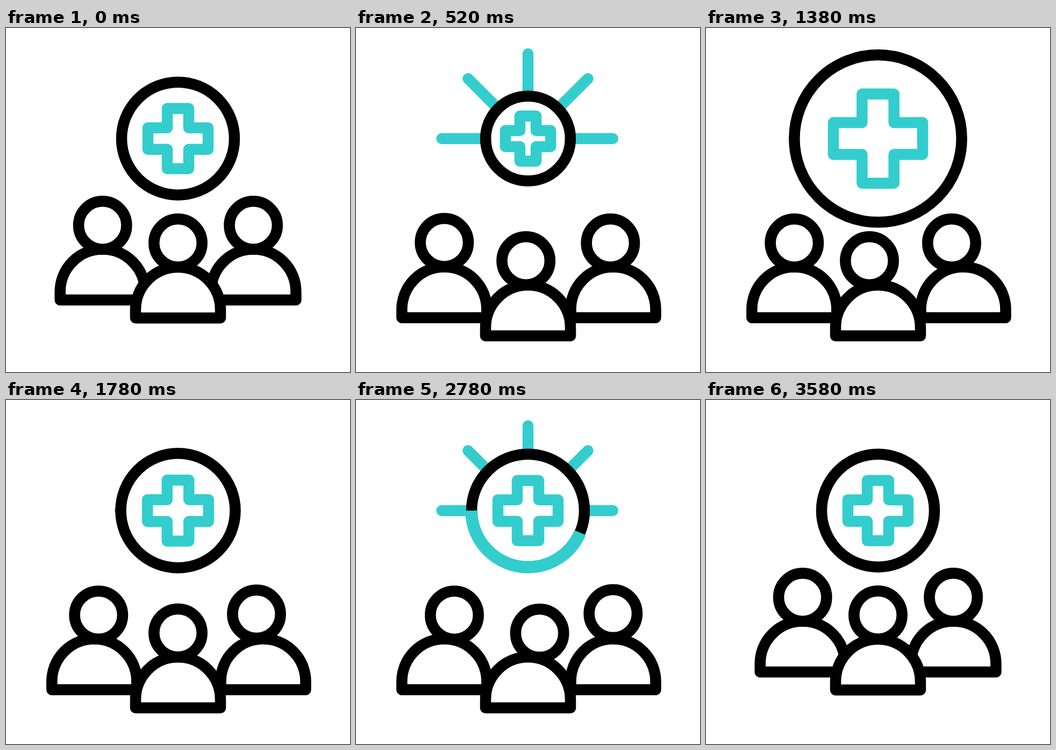
Animation, 640 px wide and 640 px high, one loop 3.6 s. Source, as an HTML page:

```html
<!DOCTYPE html>
<html lang="en">
<head>
<meta charset="utf-8">
<title>Health community</title>
<style>
  html, body { margin: 0; width: 100%; height: 100%; overflow: hidden; background: #fff; }
  svg { display: block; width: 100vw; height: 100vh; }
  svg * { vector-effect: non-scaling-stroke; }
  .line { fill: #fff; stroke: #000; stroke-width: 20.5; stroke-linejoin: round; }
  .teal { fill: none; stroke: #33cdcd; stroke-width: 20.5; stroke-linejoin: round; stroke-linecap: round; }
  #ring { stroke-width: 23; stroke-linecap: butt; }
</style>
</head>
<body>
<svg viewBox="0 0 640 640">
  <g id="rays" transform="translate(320 205.7)"></g>
  <g id="badge">
    <circle class="line" r="105"/>
    <path class="teal" d="M-20-56H20V-20H56V20H20V56H-20V20H-56V-20H-20Z"/>
  </g>
  <circle id="ring" class="teal" r="105.3" pathLength="1" transform="translate(320 205.7) rotate(180)"/>
  <g id="people"></g>
</svg>
<script>
const LOOP = 3600;
const byId = id => document.getElementById(id);

function add(parent, tag, attrs) {
  const el = document.createElementNS('http://www.w3.org/2000/svg', tag);
  for (const name in attrs) el.setAttribute(name, attrs[name]);
  return parent.appendChild(el);
}

// Eased value of a track given as time, value, time, value, ...
function at(t, track) {
  let i = 0;
  while (i + 2 < track.length && track[i + 2] <= t) i += 2;
  if (i + 2 >= track.length) return track[i + 1];
  const u = Math.max(0, (t - track[i]) / (track[i + 2] - track[i]));
  return track[i + 1] + (track[i + 3] - track[i + 1]) * (1 - Math.cos(Math.PI * u)) / 2;
}

const place = (el, x, y, rest = '') => el.setAttribute('transform', `translate(${x} ${y}) ${rest}`);

// Step away from the badge, glance aside, glance back, return
const track = (rest, out, first, second) =>
  [0, rest, 400, out, 772, first, 1600, first, 2000, second, 3160, second, 3560, rest];

const people = [
  { x: track(179.7, 164.3, 164.3, 164.3), y: track(506, 539, 539, 539),
    headX: track(179.7, 164.3, 164.3, 183), headY: track(367, 398.7, 400, 400.2) },
  { x: track(460.4, 478.5, 478.5, 478.5), y: track(506, 539, 539, 539),
    headX: track(460.2, 478.5, 457, 478.3),
    headY: [0, 367, 400, 400, 1600, 400, 2000, 396, 2400, 396, 3160, 398.7, 3560, 367] },
  { x: [0, 320], y: track(539.5, 572.8, 572.8, 572.8),
    headX: track(320, 320, 304, 341.6), headY: track(400, 433, 433, 433.8) }
];
for (const p of people) {
  p.body = add(byId('people'), 'path', { class: 'line', d: 'M-79 0V-15.5A79 79 0 0 1 79-15.5V0Z' });
  p.head = add(byId('people'), 'circle', { class: 'line', r: 44.7 });
}

const rays = [180, 225, 270, 315, 360].map(angle => ({
  shift: angle === 180 ? 2.7 : 0,
  el: add(byId('rays'), 'line', { class: 'teal', transform: `rotate(${angle})` })
}));

const scale = [0, 1, 120, 1, 540, .75, 555, .75, 1319, 1.5, 1837, 1];
const rayEnd = [0, 66, 120, 66, 480, 157.7, 1150, 157.7, 1500, 66, 1600, 66, 2000, 157.7, 3160, 157.7, 3520, 66];
const rayStart = [0, 66, 1980, 66, 2360, 138, 2560, 138, 3000, 66];
const ringEnd = [0, 0, 1840, 0, 2360, 1];
const ringStart = [0, 0, 2500, 0, 3020, 1];

function draw(t) {
  place(byId('badge'), 320, 205.7, `scale(${at(t, scale)})`);
  for (const { el, shift } of rays) {
    const end = at(t, rayEnd);
    el.setAttribute('x1', Math.min(at(t, rayStart), end) + shift);
    el.setAttribute('x2', end + shift + .01);
  }
  const from = at(t, ringStart), to = at(t, ringEnd), ring = byId('ring');
  ring.style.display = to - from > .001 ? '' : 'none';
  // The dash pattern needs real lengths because strokes do not scale
  const length = 2 * Math.PI * 105.3;
  ring.removeAttribute('pathLength');
  ring.setAttribute('stroke-dasharray',
    to - from > .999 ? 'none' : `0 ${from * length} ${(to - from) * length} ${2 * length}`);
  for (const p of people) {
    place(p.body, at(t, p.x), at(t, p.y));
    place(p.head, at(t, p.headX), at(t, p.headY));
  }
}

const begin = performance.now();
function tick() {
  draw((performance.now() - begin) % LOOP);
  requestAnimationFrame(tick);
}
tick();
</script>
</body>
</html>
```
